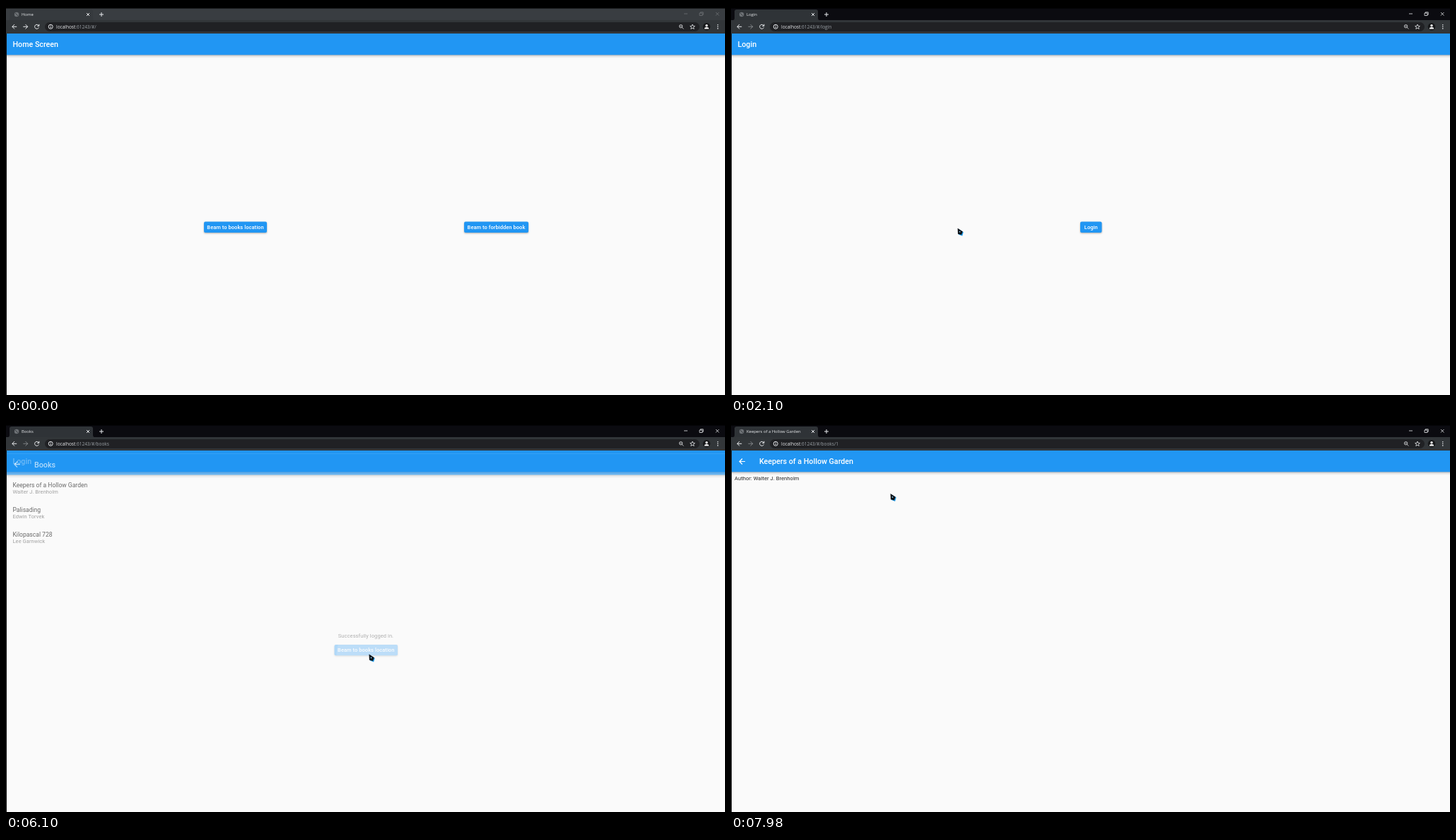
An HTML page for the animation above (8000 ms loop, 1017 px wide and 551 px high).

```html
<!DOCTYPE html>
<html lang="en">
<head>
<meta charset="utf-8">
<title>Book browser</title>
<style>
html, body { margin: 0; width: 100%; height: 100%; overflow: hidden; background: #000; }
svg { display: block; width: 1017px; height: 551px; }
text { font-family: Roboto, sans-serif; white-space: pre; }
.ui { font-family: "Open Sans", "Noto Sans", sans-serif; }
.bar { font-size: 10.7px; font-weight: 500; fill: #fff; }
.label { font-size: 7.5px; font-weight: 500; fill: #fff; text-anchor: middle; letter-spacing: .05px; }
.body { font-size: 7.5px; fill: #000; fill-opacity: .87; letter-spacing: .08px; }
.item { font-size: 8.56px; fill: #000; fill-opacity: .87; }
.sub { font-size: 7.5px; fill: #000; fill-opacity: .54; letter-spacing: .06px; }
.line { fill: none; stroke: #e8eaed; stroke-width: 1; }
.btn { filter: drop-shadow(0 1px 1px rgba(0, 0, 0, .32)); }
</style>
</head>
<body>
<svg id="stage" viewBox="0 0 1017 551" xmlns="http://www.w3.org/2000/svg"></svg>
<script>
const LOOP = 8000, SLIDE = 300;
const books = [
  ["Keepers of a Hollow Garden", "Walter J. Brenholm"],
  ["Palisading", "Edwin Torvek"],
  ["Kilopascal 728", "Lee Garnwick"]
];
const pages = [
  { start: -1e4, title: "Home", path: "/#/" },
  { start: 1537, title: "Login", path: "/#/login" },
  { start: 5869, title: "Books", path: "/#/books" },
  { start: 7635, title: books[0][0], path: "/#/books/1" }
];
const LOGGED_IN = 4000;
const rowY = i => 69.5 + 35 * i;

// Clickable areas; each is live between its from and to times.
const targets = [
  { id: "toBooks", x: 280, y: 305.5, w: 89, h: 15.5, from: 0, to: 1537, press: 1430, label: "Beam to books location" },
  { id: "toForbidden", x: 648, y: 305.5, w: 91, h: 15.5, from: 0, to: 1537, label: "Beam to forbidden book" },
  { id: "login", x: 494, y: 305.5, w: 30.5, h: 15.5, from: 1537, to: LOGGED_IN, press: 3900, label: "Login" },
  { id: "again", x: 464.5, y: 314, w: 89.5, h: 15.2, from: LOGGED_IN, to: 5869, press: 5760, label: "Beam to books location" },
  ...books.map((b, i) => ({
    id: "row" + i, x: 1, y: rowY(i), w: 1016, h: 35, from: 5869, to: 7635, press: i ? 0 : 7510, row: true
  }))
];

// Pointer moves: begin, end, x, y, sag of the path.
const moves = [
  [1100, 1420, 321, 315, 0],
  [1950, 2700, 317, 312, 0],
  [2760, 3500, 515.5, 308.5, 8],
  [4450, 5200, 513.5, 327.5, 0],
  [6250, 7190, 227.5, 100, 0],
  [7300, 7480, 225.5, 100, 0]
];

const clamp = v => Math.max(0, Math.min(1, v));
const smooth = v => v * v * (3 - 2 * v);

function bezier(x1, y1, x2, y2) {
  const at = (a, b, s) => 3 * s * (1 - s) * (1 - s) * a + 3 * s * s * (1 - s) * b + s * s * s;
  return x => {
    let lo = 0, hi = 1;
    for (let i = 0; i < 24; i++) {
      const mid = (lo + hi) / 2;
      if (at(x1, x2, mid) < x) lo = mid; else hi = mid;
    }
    return at(y1, y2, (lo + hi) / 2);
  };
}
const slideEase = bezier(.4, 0, .2, 1), fadeEase = bezier(.42, 0, 1, 1);

function pointer(t) {
  let x = 327, y = 562;
  for (const [a, b, px, py, sag] of moves) {
    if (t <= a) break;
    const k = smooth(clamp((t - a) / (b - a)));
    x += (px - x) * k;
    y += (py - y) * k + sag * 4 * k * (1 - k);
  }
  return [x, y];
}

function isOver(b, t) {
  if (t < b.from || t >= b.to) return false;
  const [x, y] = pointer(t);
  return x >= b.x && x <= b.x + b.w && y >= b.y && y < b.y + b.h;
}

function hover(b, t) {
  const n = 12, span = b.row ? 150 : 60;
  let sum = 0;
  for (let i = 0; i < n; i++) sum += isOver(b, t - span * i / n);
  return sum / n;
}

const text = (cls, x, y, s) => `<text class="${cls}" x="${x}" y="${y}">${s}</text>`;
const line = (d, extra = "") => `<path class="line" d="${d}" ${extra}/>`;
const arrow = (x, y, dir, r, extra) =>
  line(`M${x + dir * r} ${y}H${x - dir * r}M${x} ${y - r}L${x - dir * r} ${y}L${x} ${y + r}`, extra);

const ink = b => {
  const tint = b.row ? "#000" : "#fff", box = `x="${b.x}" y="${b.y}" width="${b.w}" height="${b.h}"`;
  const r = b.row ? 0 : 2;
  return `<clipPath id="${b.id}Clip"><rect ${box} rx="${r}"/></clipPath>
    <rect id="${b.id}Hover" ${box} rx="${r}" fill="${tint}" opacity="0"/>
    <g clip-path="url(#${b.id}Clip)"><circle id="${b.id}Ink" fill="${tint}" opacity="0"/></g>`;
};
const button = id => {
  const b = targets.find(o => o.id === id);
  return `<rect class="btn" x="${b.x}" y="${b.y}" width="${b.w}" height="${b.h}" rx="2" fill="#2196f3"/>` +
    ink(b) + text("label", b.x + b.w / 2, b.y + b.h / 2 + 2.7, b.label);
};
const page = (i, title, back, content) => `<g id="page${i}">
  <rect x="1" y="39" width="1016" height="512" fill="#fafafa"/>${content}
  <rect x="1" y="69" width="1016" height="5" fill="url(#shade)"/>
  <rect x="1" y="39" width="1016" height="30.3" fill="#2196f3"/>
  ${back ? arrow(16, 54.5, 1, 4, 'style="stroke:#fff;stroke-width:1.2"') : ""}
  ${text("bar", back ? 40 : 9.5, 58.4, title)}</g>`;

const list = books.map(([name, author], i) =>
  ink(targets.find(b => b.id === "row" + i)) +
  text("item", 9.5, rowY(i) + 17.3, name) + text("sub", 9.5, rowY(i) + 26.6, author)).join("");

const chrome = `
  <rect width="1017" height="39" fill="#000"/>
  <rect id="strip" y="3.5" width="1017" height="17"/>
  <path id="tab" d="M2 20.5Q5 20 5 17V8Q5 5 8 5H120Q123 5 123 8V17Q123 20 126 20.5Z"/>
  <rect y="20" width="1017" height="19" fill="#323639"/>
  <rect x="55" y="23" width="926" height="13" rx="6.5" fill="#202124"/>
  <circle cx="15" cy="12" r="3.2" fill="#6d7175"/>
  ${line("M13 10L17 14", 'style="stroke:#3c4043"')}
  <text id="tabTitle" class="ui" x="22" y="14.1" font-size="5.9" fill="#e8eaed"></text>
  ${line("M114 10L118 14M118 10L114 14")}${line("M132 12H138M135 9V15")}
  <g id="controls">
    ${line("M959 11H964", 'style="stroke-width:.8"')}
    ${line("M981 10H985V13.5H981ZM982.2 10V8.8H986.2V12.3H985", 'style="stroke-width:.8"')}
    ${line("M1004 9L1008.5 13.5M1008.5 9L1004 13.5", 'style="stroke-width:.8"')}
  </g>
  ${arrow(12, 29.3, 1, 3.2)}
  <g id="forward">${arrow(27.5, 29.3, -1, 3.2)}</g>
  ${line("M46.3 28A3 3 0 1 0 46.4 30.4M46.8 25.8V28.4H44.2")}
  <circle class="line" cx="63.2" cy="29.3" r="3"/>${line("M63.2 28.8V31M63.2 27.2V28")}
  <text class="ui" x="71" y="31.6" font-size="6.5" fill="#e8eaed">localhost<tspan fill="#9aa0a6">:61243<tspan id="path"></tspan></tspan></text>
  <circle class="line" cx="954.6" cy="28.7" r="2.2" style="stroke-width:.8"/>
  ${line("M956.2 30.3L958.4 32.5M953.5 28.7H955.7", 'style="stroke-width:.8"')}
  ${line("M971 26L972 28.4L974.4 28.5L972.5 30.1L973.2 32.5L971 31.1L968.8 32.5L969.5 30.1L967.6 28.5L970 28.4Z", 'style="stroke-width:.8"')}
  <circle cx="991" cy="29.3" r="5.2" fill="#17181a"/>
  <circle cx="991" cy="27.8" r="1.7" fill="#fff"/><path d="M987.8 32.4Q988 30 991 30T994.2 32.4Z" fill="#fff"/>
  ${[26.7, 29.3, 31.9].map(y => `<circle cx="1006.8" cy="${y}" r=".8" fill="#e8eaed"/>`).join("")}`;

const stage = document.getElementById("stage");
stage.innerHTML = `<defs>
    <linearGradient id="shade" x2="0" y2="1">
      <stop offset="0" stop-color="#000" stop-opacity=".3"/><stop offset=".4" stop-color="#000" stop-opacity=".1"/>
      <stop offset="1" stop-color="#000" stop-opacity="0"/>
    </linearGradient>
    <clipPath id="view"><rect x="1" y="39" width="1016" height="512"/></clipPath>
  </defs>
  <rect width="1017" height="551" fill="#111"/>
  <g clip-path="url(#view)">
    ${page(0, "Home Screen", false, button("toBooks") + button("toForbidden"))}
    ${page(1, "Login", false, `<g id="signIn">${button("login")}</g>
      <g id="welcome"><text class="body" x="509" y="304.2" text-anchor="middle">Successfully logged in.</text>${button("again")}</g>`)}
    ${page(2, "Books", true, list)}
    ${page(3, books[0][0], true, text("body", 5, 81, "Author: " + books[0][1]))}
  </g>
  ${chrome}
  <g id="cursor">
    <g id="arrow">
      <path d="M1 1L8.2 5.5L6.6 11L1.4 9Z" fill="#1f9be8"/>
      <path d="M0 0L7.2 4.8L5.4 9.4L.4 8.2Z" fill="#0c1116"/>
      <circle cx="3" cy="5" r=".9" fill="#8cc4e6"/>
    </g>
    <path id="hand" d="M-1 .9Q0-.5 .9 .9V4L3.6 4.6Q4.8 5 4.7 6.3L4 9.6H-.4L-2.6 6.6Q-3 5.4-1 6.1Z" fill="#fff" stroke="#33373b" stroke-width=".8" stroke-linejoin="round"/>
  </g>`;

const el = {};
stage.querySelectorAll("[id]").forEach(n => el[n.id] = n);
const set = (id, name, v) => el[id].setAttribute(name, v);
const show = (id, on) => set(id, "display", on ? "inline" : "none");

function drawInk(b, t) {
  set(b.id + "Hover", "opacity", hover(b, t) * (b.row ? .04 : .08));
  const age = b.press ? t - b.press : -1;
  if (age < 0 || age > 600) return set(b.id + "Ink", "opacity", 0);
  const [x, y] = pointer(b.press), full = b.row ? 800 : 46;
  set(b.id + "Ink", "cx", x);
  set(b.id + "Ink", "cy", y);
  set(b.id + "Ink", "r", full * slideEase(clamp(age / 260)));
  set(b.id + "Ink", "opacity", (b.row ? .08 : .24) * clamp(age / 75) * (1 - clamp((age - 225) / 375)));
}

function draw(t) {
  let top = 0;
  pages.forEach((p, i) => {
    const k = clamp((t - p.start) / SLIDE), next = pages[i + 1];
    if (t >= p.start) top = i;
    show("page" + i, k > 0 && !(next && t >= next.start + SLIDE));
    set("page" + i, "opacity", fadeEase(k));
    set("page" + i, "transform", `translate(0 ${128 * (1 - slideEase(k))})`);
  });
  show("signIn", t < LOGGED_IN);
  show("welcome", t >= LOGGED_IN);
  targets.forEach(b => drawInk(b, t));

  const active = t >= 20;
  set("strip", "fill", active ? "#0b0b10" : "#393d41");
  set("tab", "fill", active ? "#2f3337" : "#363a3e");
  set("controls", "opacity", active ? 1 : .3);
  set("forward", "opacity", top ? .42 : 1);
  el.tabTitle.textContent = pages[top].title;
  el.path.textContent = pages[top].path;

  const [x, y] = pointer(t), hand = targets.some(b => isOver(b, t));
  set("cursor", "transform", `translate(${x} ${y})`);
  show("hand", hand);
  show("arrow", !hand);
}

function tick() {
  draw(performance.now() % LOOP);
  requestAnimationFrame(tick);
}
tick();
</script>
</body>
</html>
```
